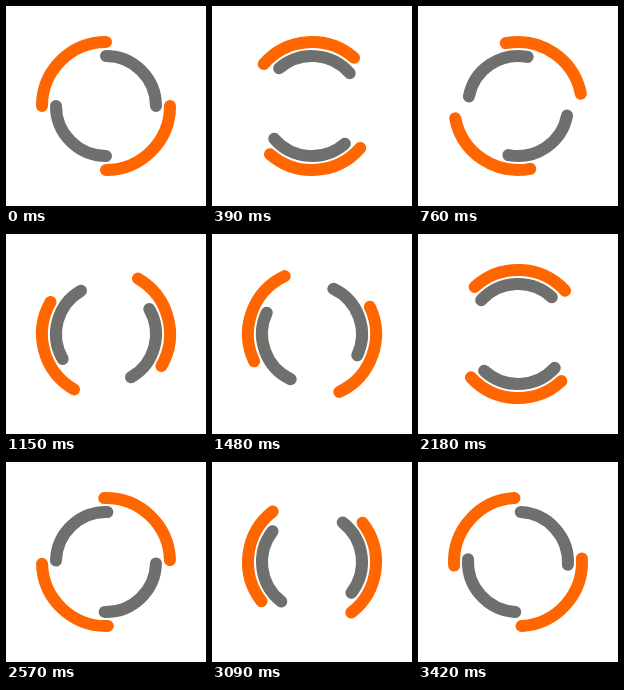
An HTML page that plays this animation: 200 by 200 pixels, repeating every 3.45 s.

```html
<!DOCTYPE html>
<html lang="en">
<head>
<meta charset="utf-8">
<title>Double ring spinner</title>
<style>
  html, body { margin: 0; width: 100%; height: 100%; overflow: hidden; background: #fff; }
  svg { display: block; width: 100vw; height: 100vh; }
  path { fill: none; stroke-width: 12; stroke-linecap: round; }
</style>
</head>
<body>
<svg viewBox="-100 -100 200 200">
  <path id="outer" stroke="#ff6600" d="M64 0A64 64 0 0 1 0 64M-64 0A64 64 0 0 1 0 -64"/>
  <path id="inner" stroke="#6f6f6e" d="M0 50A50 50 0 0 1 -50 0M0 -50A50 50 0 0 1 50 0"/>
</svg>
<script>
  const LOOP = 3450, STEPS = 114;
  const LEAD = 6; // ms, aligns the steps with a 10 ms clock
  const outer = document.getElementById('outer');
  const inner = document.getElementById('inner');

  // The rings turn once per loop in opposite directions, in small even steps.
  function draw() {
    const step = Math.floor((performance.now() % LOOP + LEAD) / LOOP * STEPS) % STEPS;
    const angle = step * 360 / STEPS;
    outer.setAttribute('transform', `rotate(${angle})`);
    inner.setAttribute('transform', `rotate(${-angle})`);
    requestAnimationFrame(draw);
  }
  draw();
</script>
</body>
</html>
```
